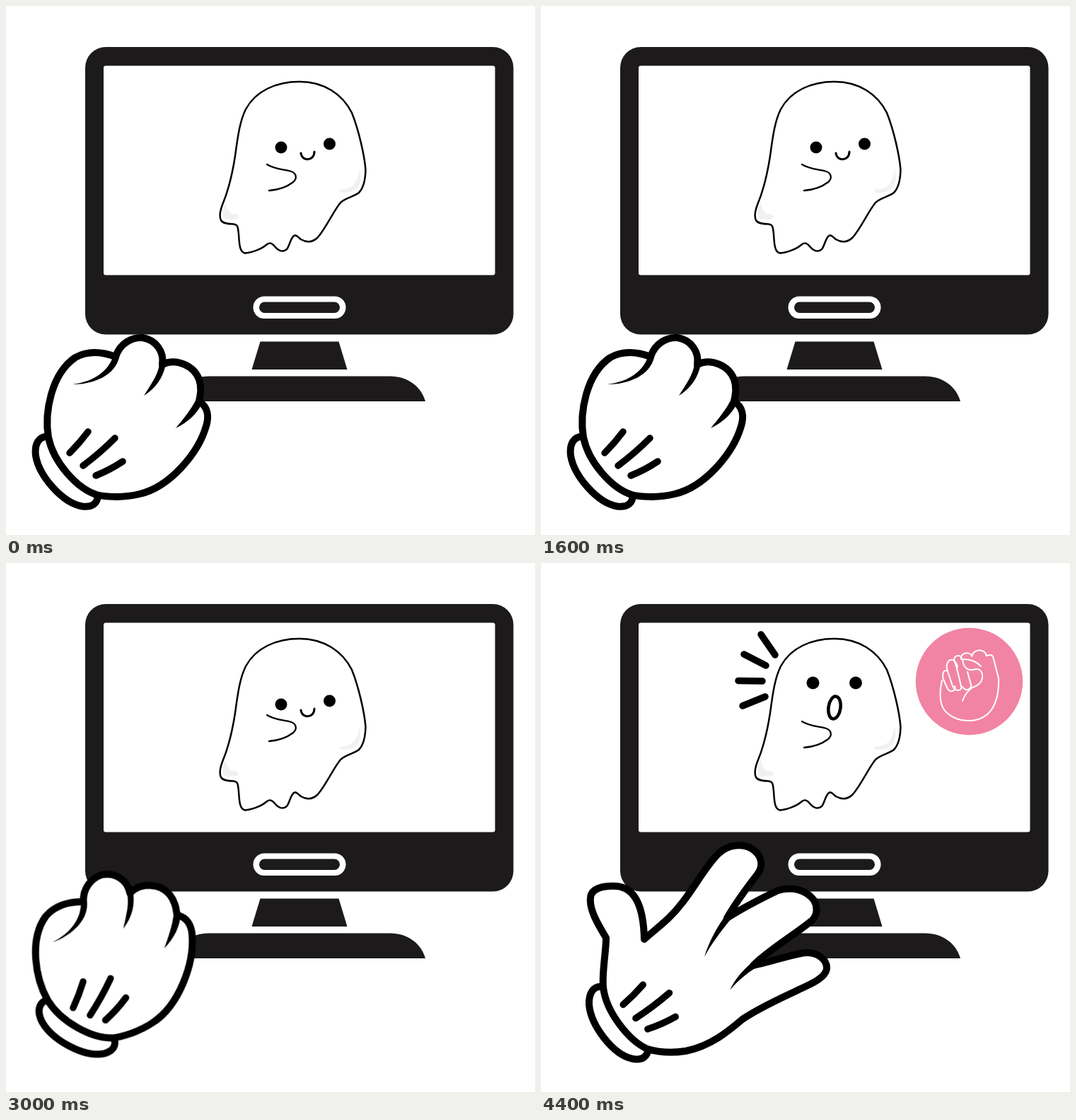
An HTML page that plays this animation: 748 by 748 pixels, repeating every 5000 ms.

```html
<!DOCTYPE html>
<html lang="en">
<head>
<meta charset="utf-8">
<title>Rock and paper with a ghost</title>
<style>
  html, body { margin: 0; width: 100%; height: 100%; overflow: hidden; background: #fff; }
  svg { display: block; width: 100%; height: 100%; }

  .line { fill: none; stroke: #000; stroke-linecap: round; stroke-linejoin: round; }
  .glove { fill: #fff; stroke: #000; stroke-width: 10; stroke-linecap: round; stroke-linejoin: round; }
  .icon { fill: none; stroke: #fff; stroke-width: 2; stroke-linecap: round; stroke-linejoin: round; }
  .dark { fill: #1c1a1b; }

  /* Each round: down, up, down, up, reveal */
  .fist, .arm, .open, .paper, .rock, .calm, .shock { animation: 5s step-end infinite; }
  .fist { animation-name: shake, fist; }
  .arm { animation-name: arm; }
  .open { animation-name: open; }
  .paper { animation-name: paper; }
  .rock { animation-name: rock; }
  .calm { animation-name: calm; }
  .shock { animation-name: shock; }

  @keyframes shake {
    0%, 8%, 24%, 32%, 48%, 56%, 72%, 80%, 100% { transform: none; }
    4%, 12%, 28%, 36%, 52%, 60%, 76%, 84% {
      transform: translate(102px, 610.5px) rotate(-20deg) translate(-103px, -617px);
    }
  }
  @keyframes arm {
    0%, 8%, 16%, 32%, 40%, 56%, 64%, 80%, 88%, 100% { transform: none; }
    4%, 12%, 28%, 36%, 52%, 60%, 76%, 84% { transform: translateY(-9px); }
  }
  @keyframes fist { 0%, 48% { opacity: 1; } 40%, 88%, 100% { opacity: 0; } }
  @keyframes open { 0%, 48% { opacity: 0; } 40%, 88%, 100% { opacity: 1; } }
  @keyframes paper { 0%, 24%, 48%, 100% { opacity: 0; } 16%, 40% { opacity: 1; } }
  @keyframes rock { 0%, 72% { opacity: 0; } 64%, 88%, 100% { opacity: 1; } }
  @keyframes calm { 0% { opacity: 1; } 88%, 100% { opacity: 0; } }
  @keyframes shock { 0% { opacity: 0; } 88%, 100% { opacity: 1; } }
</style>
</head>
<body>
<svg viewBox="0 0 748 748">
  <defs>
    <path id="cuff" class="glove" d="M59 609C46 608 40 620 42 636C47 665 80 703 108 707.500C122 709 130 704 130 690L100 660Z"/>
    <path id="seams" class="line" stroke-width="9.500" d="M116 602Q104 618 90 632M154 611Q133 632 109 650M165 644Q147 656 127 664"/>
  </defs>

  <!-- Monitor -->
  <g class="dark">
    <rect x="112" y="58" width="605.500" height="406.500" rx="29"/>
    <path d="M359.500 474.500H470.500L482.500 514H347.500Z"/>
    <path d="M237 559C243 538 262 523.500 287 523.500H543C568 523.500 587 538 593 559Z"/>
  </g>
  <rect x="138" y="84.500" width="553.500" height="296" rx="3" fill="#fff"/>
  <rect x="349.500" y="410.500" width="131" height="31.500" rx="15.750" fill="#fff"/>
  <rect class="dark" x="358" y="418.500" width="114" height="15.500" rx="7.750"/>

  <!-- Ghost -->
  <g fill="#f1f1f1">
    <path d="M310 278C313 288 316 294 322 294C330 294 331 300 325 301.500L312 302C305 301 305 291 310 278Z"/>
    <path d="M500 231C503 242 502 254 494 260C488 264 478 265 472 263C470 260 473 259 479 259C492 257 497 248 500 231Z"/>
  </g>
  <path class="line" stroke-width="2.500" d="M415 107C450 107 476 125 489 151C499 176 507 212 508.500 232C508 248 505 258 499 264C491 270 480 271 473 278C463 290 453 313 441 327C433 335 424 334 417 330C412 326 410 323 407 325C402 329 401 339 397 344C391 349 385 346 380 340C376 335 373 334 369 337C361 344 347 349 338 349.500C330 348 330 336 329 323C328 313 328 309 322 308.500C315 308 307 308 304 303C301 297 303 289 306 281C314 262 320 238 324 212C328 182 331 162 339 146C353 120 382 107 415 107Z"/>
  <path class="line arm" stroke-width="2.300" d="M369 224C380 231 394 231 402 233.500C411 236 412 244 406 249C397 256 385 260 372 261"/>
  <g class="calm">
    <circle cx="389" cy="200" r="8.500"/>
    <circle cx="457.500" cy="195" r="8.500"/>
    <path class="line" stroke-width="3" d="M417 208C418 220 436 220 436 206"/>
  </g>
  <g class="shock">
    <circle cx="384.500" cy="169.500" r="9"/>
    <circle cx="445" cy="169.500" r="9"/>
    <ellipse class="line" stroke-width="4.500" cx="415" cy="204.500" rx="8.500" ry="16" transform="rotate(8 415 204.500)"/>
    <path class="line" stroke-width="9.500" d="M311 101L331 130M287 129L318 145M279 166.500L313 167M285 202L317 189"/>
  </g>

  <!-- The ghost's choice -->
  <g class="paper">
    <circle cx="608.500" cy="167.500" r="75.700" fill="#c38fdd"/>
    <path class="icon" d="M566 155C560 155 559 160 563 162C573 166 576 174 580 184C585 196 591 206 597 215C603 225 621 224 627 217C632 207 641 199 642.500 190C643 175 650 165 656 154C659 149 654 147 651 151L639 167C636 171 632 170 633 165L641 130C642 123 636 122 634 127L626 157C625 161 621 161 621 157L622 118C622 111 614 111 613 118L611 155C610 159 607 159 606 155L602 119C600 112 592 113 592 120L596 162C597 170 594 178 590 178C584 178 579 171 576 164C573 158 570 155 566 155Z"/>
  </g>
  <g class="rock">
    <circle cx="605.500" cy="167.500" r="75.700" fill="#f184a4"/>
    <path class="icon" d="M567 166C563 184 563 201 573 211C590 227 617 226 631 214C644 203 648 181 647 163L639 132C636 128 633 131 629 131
      M574 152C567 151 567 161 570 167L575 178C579 184 587 181 585 174
      M582 174L575 153C571 142 577 136 582 137C586 138 588 143 589 147
      M582 174C586 183 596 181 594 174L588 149
      M596 175C601 183 609 178 608 172L603 154
      M588 149L584 137C585 129 593 130 595 135
      M594 136C593 126 606 125 609 131M596 136C597 147 602 152 611 151C620 148 625 153 624 163C622 171 617 174 610 176C603 181 599 186 596 195
      M596 136C604 136 615 138 622 146M609 132C612 122 625 120 630 130"/>
  </g>

  <!-- Player's hand -->
  <g class="fist">
    <use href="#cuff"/>
    <path class="glove" d="M60 610C54 575 64 520 98 497C114 488 134 488 155 496C161 477 178 468 193 469C212 472 224 489 221 507C241 497 266 509 273 528C277 540 275 549 273 559C286 567 287 581 283 594C272 632 232 680 189 690C165 696 140 694 128 691C100 682 67 645 60 610Z"/>
    <path d="M152 494C145 516 125 531 94 535C125 535 154 522 160 497ZM217 505C216 520 205 535 195 551C212 540 222 526 226 506ZM269 556C262 570 250 585 240 597C258 588 271 576 278 560Z"/>
    <use href="#seams"/>
  </g>
  <g class="open">
    <g id="wrist" transform="translate(26 -5) rotate(4 127 633)"><use href="#cuff"/></g>
    <path class="glove" d="M88 600C86 580 92 550 92 530C80 510 68 490 70 473C71 460 88 456 107 457C132 459 145 484 146 532C165 515 182 504 200 480C217 459 235 425 252 410C265 398 285 396 298 404C314 414 314 430 306 440C292 458 278 476 263 502C285 488 310 475 335 463C355 457 375 462 386 477C393 490 389 502 380 508C355 528 325 545 300 569C322 565 345 556 370 551.500C390 549 405 560 404 574C402 586 385 594 365 603C340 615 310 628 285 645C265 662 240 683 205 690C180 694 163 691 150 687C124 675 92 635 88 600Z"/>
    <path d="M259 501C247 518 237 537 231 557C240 540 252 524 268 504ZM297 566C284 577 274 589 267 604C279 590 290 581 304 572Z"/>
    <use href="#seams" transform="translate(26 -5) rotate(4 127 633)"/>
  </g>
</svg>
</body>
</html>
```
